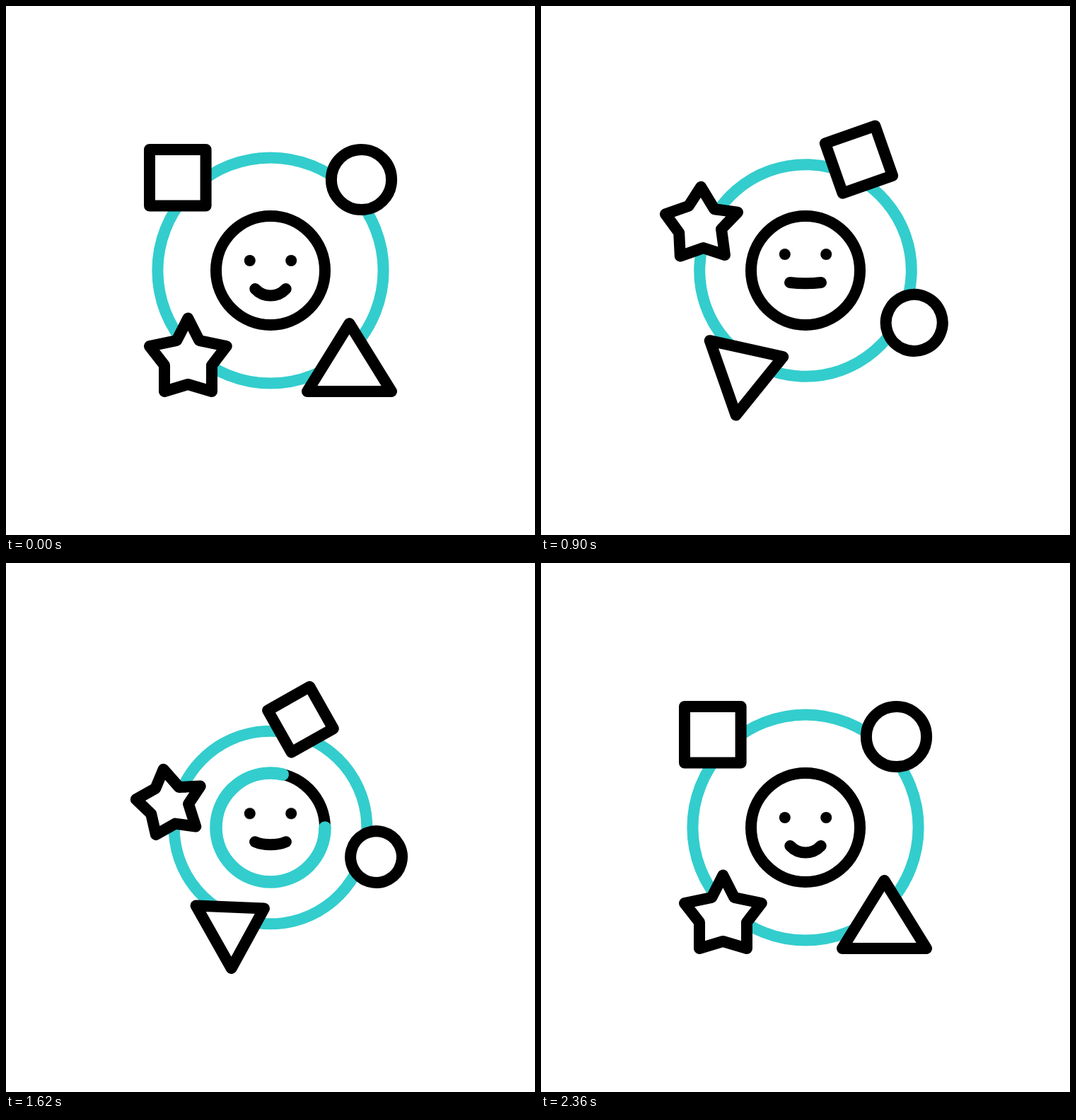
Animation, 748 px wide and 748 px high, one loop 2.4 s. Source, as an HTML page:

```html
<!DOCTYPE html>
<html lang="en">
<head>
<meta charset="utf-8">
<title>Smiling face with orbiting shapes</title>
<style>
  @property --turn { syntax: "<angle>"; inherits: true; initial-value: 0deg; }
  @property --size { syntax: "<number>"; inherits: true; initial-value: 1; }

  html, body { margin: 0; width: 100%; height: 100%; overflow: hidden; background: #fff; }
  svg { display: block; width: 100vw; height: 100vh; }

  svg, svg * {
    animation-duration: 2400ms;
    animation-timing-function: cubic-bezier(.3333, 0, .6667, 1);
    animation-iteration-count: infinite;
  }

  .line { fill: none; stroke: #000; stroke-width: 16px; stroke-linecap: round; stroke-linejoin: round; }
  .teal { stroke: #33cdcd; }

  /* The orbit shrinks and turns while its lines keep their weight. */
  .orbit {
    transform-origin: 374px 374px;
    transform: rotate(var(--turn)) scale(var(--size));
    animation-name: turn, shrink;
  }
  .orbit .line { stroke-width: calc(16px / var(--size)); }
  .solid { fill: #fff; }

  .eyes { animation-name: look; }
  .mouth { animation-name: smile; }
  .sweep {
    stroke-width: 17.6px;
    stroke-dasharray: 100 100;
    animation-name: sweep, show;
    animation-timing-function: cubic-bezier(.3333, 0, .6667, 1), step-end;
  }

  @keyframes turn {
    0%, 8.333% { --turn: 0deg; }
    50% { --turn: 90deg; }
    95.833%, 100% { --turn: 0deg; }
  }
  @keyframes shrink {
    0%, 8.333% { --size: 1; }
    75% { --size: .849; }
    95.833%, 100% { --size: 1; }
  }
  @keyframes look {
    0%, 8.333%, 50.833%, 58.333%, 95.833%, 100% { transform: translateY(0); }
    25%, 34.167%, 75%, 79.167% { transform: translateY(-10px); }
  }
  @keyframes smile {
    0%, 8.333%, 50.833%, 58.333%, 95.833%, 100% { d: path("M352.3 400C364 412.6 384 412.6 395.7 400"); }
    25%, 34.167%, 75%, 79.167% { d: path("M352 390C364 390 384 390 396 390"); }
  }
  @keyframes sweep {
    0%, 50% { stroke-dashoffset: 100; }
    75% { stroke-dashoffset: 0; }
    95.833%, 100% { stroke-dashoffset: -100; }
  }
  @keyframes show {
    0% { opacity: 0; }
    50% { opacity: 1; }
    95.833%, 100% { opacity: 0; }
  }
</style>
</head>
<body>
<svg viewBox="0 0 748 748">
  <g class="orbit">
    <circle class="line teal" cx="374" cy="374" r="159.6"/>
    <rect class="line solid" x="203" y="203" width="79.6" height="79.6"/>
    <circle class="line solid" cx="502.5" cy="245.5" r="42.6"/>
    <path class="line solid" d="M485.5 449L545 545H426Z"/>
    <path class="line solid" d="M257.3 441.5L273.3 473L311.7 481L291 508V545L257.3 535L224 545V508L203 481L241.3 473Z"/>
  </g>
  <circle class="line" cx="374" cy="374" r="77"/>
  <circle class="line teal sweep" cx="374" cy="374" r="77" pathLength="100"/>
  <g class="eyes">
    <circle cx="344.8" cy="360" r="8"/>
    <circle cx="403.2" cy="360" r="8"/>
  </g>
  <path class="line mouth" d="M352.3 400C364 412.6 384 412.6 395.7 400"/>
</svg>
</body>
</html>
```
